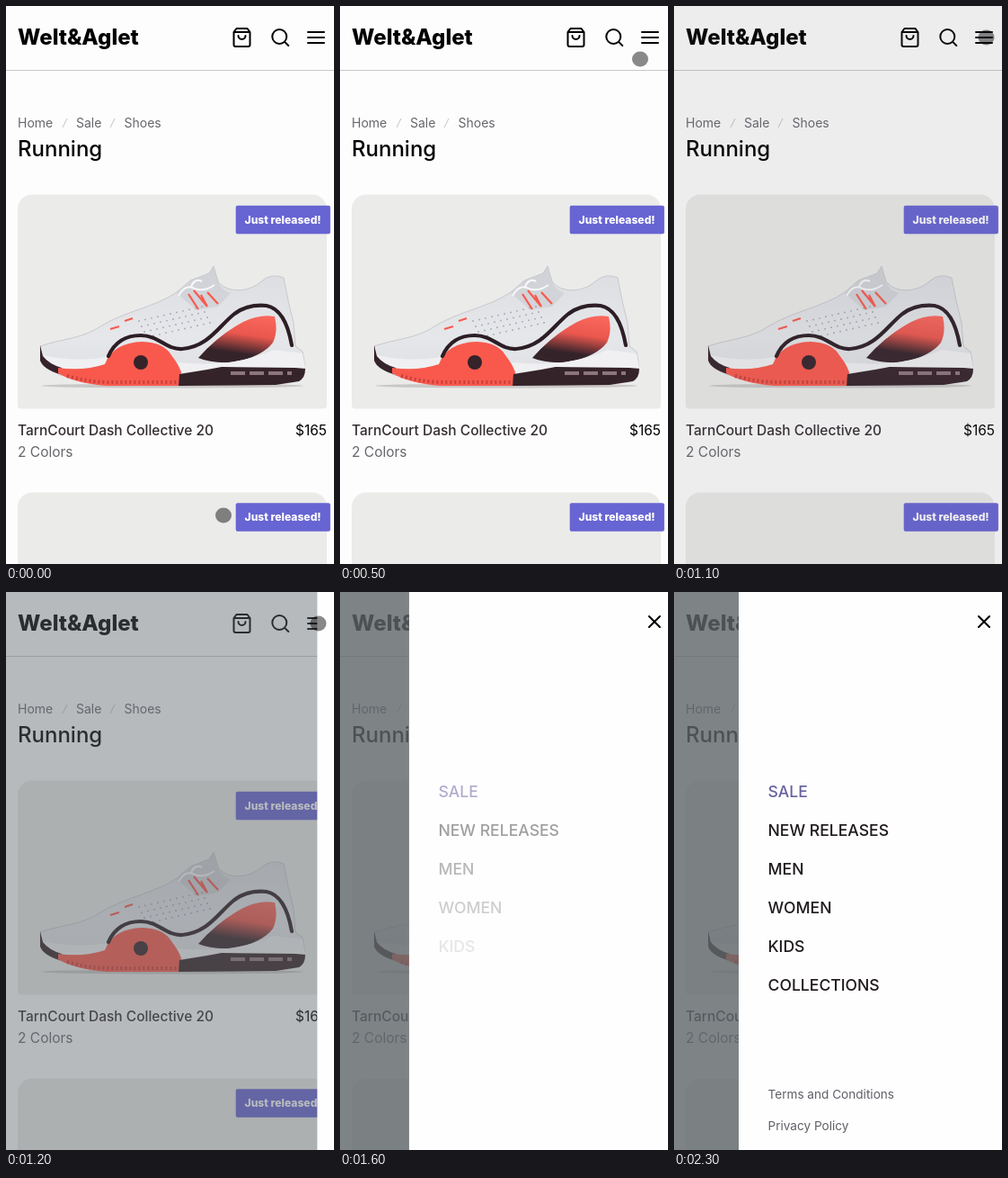
These frames come from a looping animation (365x620 px, 2500 ms). An HTML page:

```html
<!DOCTYPE html>
<html lang="en">
<head>
<meta charset="utf-8">
<title>Shoe shop menu</title>
<style>
  html, body { margin: 0; width: 100%; height: 100%; overflow: hidden; background: #fdfdfd; }
  svg { display: block; width: 365px; height: 620px; font-family: Inter, Lato, sans-serif; }
  .icon { fill: none; stroke: #000; stroke-width: 2; stroke-linecap: round; stroke-linejoin: round; }
  .crumb { font-size: 14px; fill: #66666c; }
  .badge { font-size: 12.1px; font-weight: 800; fill: #fff; }
  .info { font-size: 15.5px; }
  .nav { font-size: 17.6px; font-weight: 500; fill: #1f1a1d; }
  .foot { font-size: 13.6px; fill: #5f6067; }
</style>
</head>
<body>
<svg viewBox="0 0 365 620">
  <defs>
    <linearGradient id="upper" x1="0" y1="0" x2="0" y2="1">
      <stop offset="0" stop-color="#dcdde1"/>
      <stop offset=".6" stop-color="#e6e7ea"/>
      <stop offset="1" stop-color="#dedfe2"/>
    </linearGradient>
    <linearGradient id="heel" x1=".7" y1="0" x2=".45" y2="1">
      <stop offset="0" stop-color="#f9665b"/>
      <stop offset=".4" stop-color="#ea574e"/>
      <stop offset=".8" stop-color="#35232a"/>
    </linearGradient>
    <path id="card" d="M13 16a16 16 0 0 1 16-16h312a16 16 0 0 1 16 16v218a4 4 0 0 1-4 4h-336a4 4 0 0 1-4-4z"/>
    <g id="tag">
      <rect x="255.7" y=".2" width="105.2" height="31.6" rx="2" fill="#6764d3"/>
      <text class="badge" x="265.5" y="20">Just released!</text>
    </g>
  </defs>

  <rect width="365" height="620" fill="#fdfdfd"/>
  <text x="13" y="43" font-size="24" font-weight="800">Welt&amp;Aglet</text>
  <g class="icon">
    <path transform="translate(250.5 23)" d="M6 2L3 6v14a2 2 0 0 0 2 2h14a2 2 0 0 0 2-2V6l-3-4zM3 6h18M16 10a4 4 0 0 1-8 0"/>
    <path transform="translate(293.3 23)" d="M3 11a8 8 0 1 0 16 0a8 8 0 1 0-16 0M21 21l-4.35-4.35"/>
    <path transform="translate(333 23)" d="M3 6h18M3 12h18M3 18h18"/>
  </g>
  <path d="M0 71.5h365" stroke="#c9c9cb"/>

  <g class="crumb">
    <text x="13" y="135">Home</text>
    <text x="78" y="135">Sale</text>
    <text x="131.5" y="135">Shoes</text>
    <path d="M63 135l5-10M116 135l5-10" stroke="#c4c4c8"/>
  </g>
  <text x="13" y="167" font-size="24" font-weight="500">Running</text>

  <g fill="#ebebe9">
    <use href="#card" y="209.5"/>
    <use href="#card" y="540.5"/>
  </g>

  <g id="shoe">
    <ellipse cx="185" cy="422" rx="146" ry="2.5" fill="#c9c8c7"/>
    <path fill="url(#upper)" stroke="#bfc0c6" stroke-width=".8" d="M38 378C60 370 85 370 105 356C135 338 165 335 190 318L205 305L226 297L231 289L236 306C245 319 270 319 284 306Q296 296 309 302Q314 330 320 352L322 378L330 384Q334 400 331 412L320 418L60 410L40 398Z"/>
    <path fill="#c6c8ce" d="M190 319L206 305L226 297L231 290L236 307Q240 316 250 319L236 334L212 338Z" opacity=".5"/>
    <g id="holes" fill="#a3a5b2"/>
    <path fill="none" stroke="#f9594d" stroke-width="2.2" d="M203 320l11 17M209 316l15 18M217 321l7 13M224 318l12 13M116 359l10-3M132 350l9-3"/>
    <path fill="none" stroke="#f7f8fa" stroke-width="2" d="M192 322q8-14 18-8q10 4 22-4M206 312q4-10 12-6"/>
    <path fill="url(#heel)" d="M214 391Q236 366 264 351Q282 342 299 345Q303 362 297 374Q284 391 250 396Q228 397 214 391Z"/>
    <path fill="#f0f0f2" d="M40 388Q80 396 112 390L110 402L60 405Q46 402 40 394ZM190 396Q256 402 298 382L330 386L333 402L240 401L196 408Z"/>
    <path fill="#35232a" d="M38 377L41 389Q48 398 62 402L60 409Q42 404 38 394Z"/>
    <path fill="#f9594d" d="M58 402Q86 406 110 398Q119 374 152 373Q176 374 184 388Q192 398 195 407L192 422L112 422Q76 419 58 408Z"/>
    <path fill="none" stroke="#c63f3a" stroke-width="4" stroke-dasharray="2 3" d="M68 411Q92 418 116 418H192"/>
    <path fill="#35232a" d="M193 409L224 404L240 401L322 402L333 403Q333 413 326 417L300 421L192 422Z"/>
    <path fill="none" stroke="#8c757b" stroke-width="4" stroke-dasharray="16 5" d="M250 408H318"/>
    <path fill="none" stroke="#2c1e24" stroke-width="4.2" stroke-linecap="round" d="M114 389Q124 366 150 366C170 366 178 382 196 381C224 379 236 357 253 343Q268 331 290 333Q311 337 318 377"/>
    <circle cx="150" cy="396" r="8" fill="#35232a"/>
  </g>

  <use href="#tag" y="221.5"/>
  <use href="#tag" y="552"/>
  <g class="info">
    <text x="13" y="477" font-weight="500" fill="#332c30">TarnCourt Dash Collective 20</text>
    <text x="357" y="477" text-anchor="end">$165</text>
    <text x="13" y="501" fill="#66666c">2 Colors</text>
  </g>

  <rect id="shade" width="365" height="620" fill="#60666a" opacity="0"/>
  <g id="drawer">
    <rect x="72" width="310" height="620" fill="#fefefe"/>
    <path class="icon" d="M339 27l12 12M351 27l-12 12"/>
    <g id="links"></g>
  </g>
  <ellipse id="pointer" rx="9" ry="8.5" fill="#060608" opacity=".47"/>
</svg>

<script>
const LOOP = 2500, STEP = 100;
const $ = id => document.getElementById(id);
const shade = $('shade'), drawer = $('drawer'), pointer = $('pointer');

function add(parent, tag, attrs, text = '') {
  const el = document.createElementNS('http://www.w3.org/2000/svg', tag);
  for (const key in attrs) el.setAttribute(key, attrs[key]);
  el.textContent = text;
  return parent.appendChild(el);
}

// Perforations follow the slope of the upper
for (let row = 0; row < 4; row++)
  for (let i = 0; i < 11; i++)
    add($('holes'), 'circle', { cx: 148 + i * 7 + row * 3, cy: 350 - i * 1.6 + row * 6, r: 0.9 });

const links = ['SALE', 'NEW RELEASES', 'MEN', 'WOMEN', 'KIDS', 'COLLECTIONS'].map((label, i) =>
  add($('links'), 'text', { class: 'nav', x: 104.5, y: 228 + 43 * i }, label));
links[0].style.fill = '#68629f';
['Terms and Conditions', 'Privacy Policy'].forEach((label, i) =>
  links.push(add($('links'), 'text', { class: 'foot', x: 104.5, y: 563 + 35 * i }, label)));

const progress = (t, start, length) => Math.min(1, Math.max(0, (t - start) / length));
const smooth = p => p * p * (3 - 2 * p);
const easeOut = p => 1 - (1 - p) ** 3;
const mix = (a, b, p) => a + (b - a) * p;

// cubic-bezier(.25, .1, .25, 1), solved by bisection
function ease(x) {
  const curve = (u, a, b) => 3 * u * (1 - u) ** 2 * a + 3 * u * u * (1 - u) * b + u ** 3;
  let lo = 0, hi = 1;
  for (let i = 0; i < 20; i++) {
    const mid = (lo + hi) / 2;
    if (curve(mid, .25, .25) < x) lo = mid; else hi = mid;
  }
  return curve(lo, .1, 1);
}

function pointerAt(t) {
  if (t < 500) {
    const p = smooth(progress(t, 0, 500));
    return [mix(242, 334, p), mix(566, 59, p)];
  }
  const p = easeOut(progress(t, 500, 300));
  return [mix(334, 347.5, p), mix(59, 35, p)];
}

function draw(t) {
  const [x, y] = pointerAt(t);
  pointer.setAttribute('cx', x);
  pointer.setAttribute('cy', y);
  pointer.setAttribute('visibility', t < 1500 ? 'visible' : 'hidden');
  shade.setAttribute('opacity', 0.8 * ease(progress(t, 1040, 500)));
  const slide = 293 * (1 - easeOut(progress(t, 1188, 554)));
  drawer.setAttribute('transform', `translate(${slide.toFixed(2)} 0)`);
  links.forEach((el, i) => el.setAttribute('opacity', progress(t, 1310 + 58 * i, 560)));
}

function tick() {
  const t = performance.now() % LOOP;
  draw(Math.floor(t / STEP) * STEP);
  requestAnimationFrame(tick);
}
tick();
</script>
</body>
</html>
```
